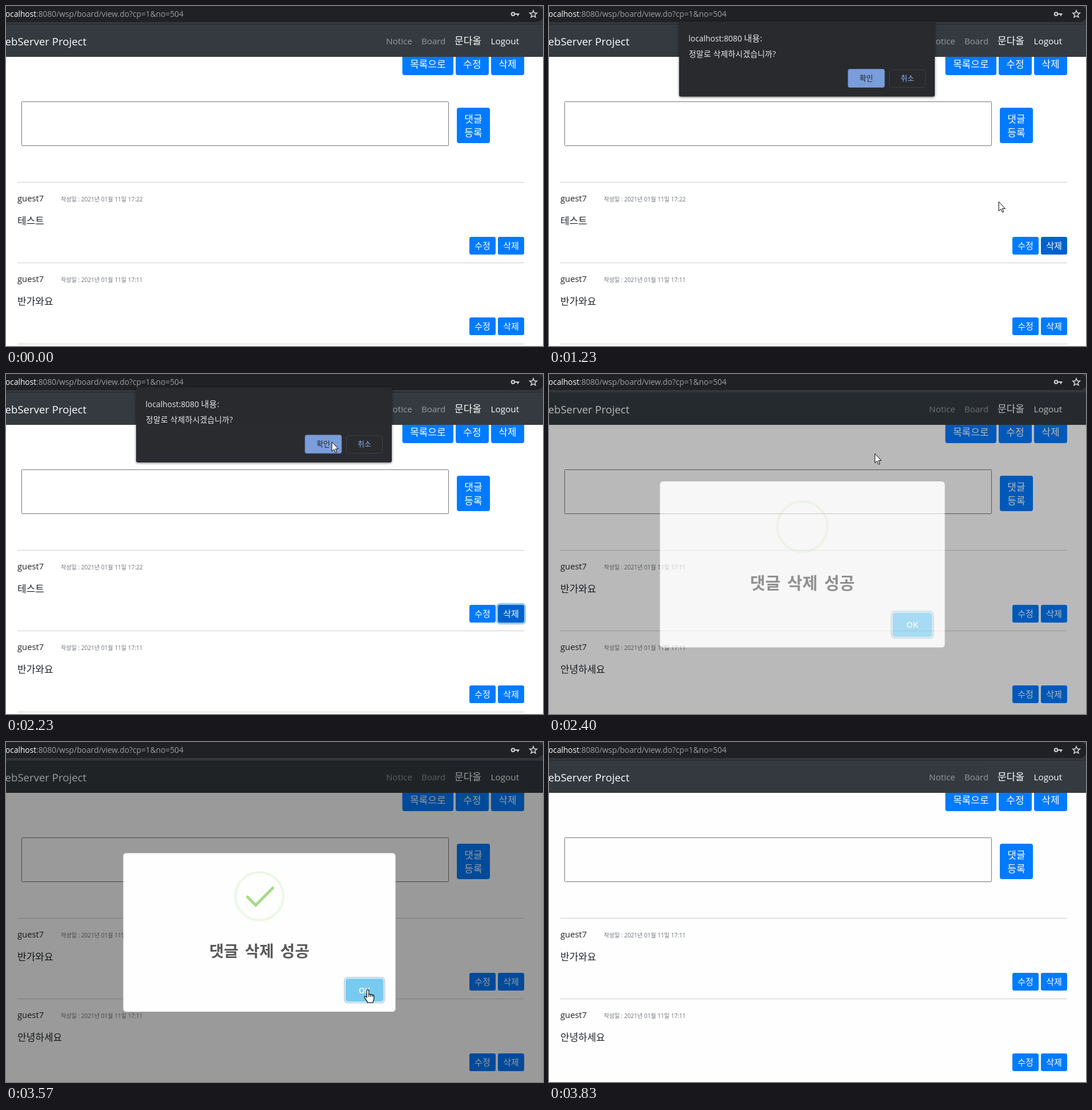
Animation of 941x595 px, one loop 3.86 s. Source, as an HTML page:

```html
<!DOCTYPE html>
<html lang="ko">
<head>
<meta charset="utf-8">
<title>Board comments</title>
<style>
html, body { margin: 0; width: 100%; height: 100%; overflow: hidden; background: #fff; }
svg { display: block; width: 941px; height: 595px; }
text { font-family: 'Open Sans', 'Noto Sans CJK KR', sans-serif; white-space: pre; }
.mid { text-anchor: middle; }
.end { text-anchor: end; }
#dialog { filter: drop-shadow(0 1px 2px rgba(0,0,0,.55)); }
</style>
</head>
<body>
<svg id="stage" viewBox="0 0 941 595"></svg>
<script>
const LOOP = 3860, DIALOG_IN = 1010, DIALOG_OUT = 2215, RELOAD = 2275,
      ALERT_IN = 2280, ALERT_OUT = 3567;
const BLUE = [0, 123, 255], DARK = [0, 98, 204];
const before = [['17:22', '테스트'], ['17:11', '반가와요']];
const after = [['17:11', '반가와요'], ['17:11', '안녕하세요']];

const text = (x, y, size, fill, str, attrs = '') =>
  `<text x="${x}" y="${y}" font-size="${size}" fill="${fill}" ${attrs}>${str}</text>`;
const rect = (x, y, w, h, fill, attrs = '') =>
  `<rect x="${x}" y="${y}" width="${w}" height="${h}" fill="${fill}" ${attrs}/>`;
const label = (x, y, size, str) => text(x, y, size, '#fff', str, 'class="mid"');
const button = (x, w, str) =>
  rect(x, 83, w, 38, '#007bff', 'rx="4"') + label(x + w / 2, 108, 17, str);
const small = (x, y, str, id) =>
  rect(x, y, 46, 31, '#007bff', `rx="3.2" id="${id}"`) + label(x + 23, y + 20.5, 15, str);

function comment(i) {
  const y = i * 141;
  return rect(20, 308 + y, 888, 1, '#ccc') +
    text(20, 342 + y, 14.8, '#212529', 'guest7') +
    text(96, 342 + y, 10.1, '#6c757d', '', `id="date${i}"`) +
    text(20, 381.5 + y, 17, '#212529', '', `id="body${i}"`) +
    small(812, 404 + y, '수정', 'edit' + i) + small(862, 404 + y, '삭제', 'del' + i);
}

const star = Array.from({ length: 10 }, (_, i) => {
  const a = i * Math.PI / 5, r = i % 2 ? 2.9 : 6.6;
  return (924 + r * Math.sin(a)).toFixed(1) + ',' + (14.4 - r * Math.cos(a)).toFixed(1);
}).join(' ');

const toolbar = rect(0, 0, 941, 33, '#35363a') + rect(-30, 0, 973, 28, '#202124', 'rx="14"') +
  rect(0, 32, 941, 1, '#292a2d') +
  text(53, 19, 13.7, '#fff', 'localhost', 'class="end"') +
  text(53, 19, 13.8, '#9aa0a6', ':8080/wsp/board/view.do?cp=1&amp;no=504') +
  `<g fill="none" stroke="#d5d7da" stroke-width="2"><circle cx="888.5" cy="14" r="2.8"/>
   <path d="M891 14H899.5M897 14V17.5"/></g>
   <polygon points="${star}" fill="none" stroke="#d5d7da" stroke-width="1.5"/>`;

const page = rect(0, 33, 941, 562, '#fff') +
  button(694.5, 89.5, '목록으로') + button(788, 58, '수정') + button(850, 58, '삭제') +
  rect(27.5, 167.5, 748, 77, '#fff', 'stroke="#767676" rx="1"') +
  rect(790, 178, 58, 62, '#007bff', 'rx="4"') +
  label(819, 204, 17, '댓글') + label(819, 228, 17, '등록') +
  comment(0) + comment(1) + rect(20, 591, 888, 1, '#ccc', 'id="lastLine"') +
  rect(860.4, 402.4, 49.2, 34.2, 'none', 'id="focus" rx="5" stroke="#268fff" stroke-opacity=".5" stroke-width="3.2"') +
  rect(0, 33, 941, 56, '#343a40') +
  text(141, 68.5, 18.6, '#fff', 'WebServer Project', 'class="end"') +
  text(666, 67, 15.3, '#999c9f', 'Notice') + text(728, 67, 15, '#999c9f', 'Board') +
  text(786, 67, 17, '#fff', '문다올') + text(849.5, 67, 15.3, '#fff', 'Logout');

const dialog = `<g id="dialog">` + rect(228, 27, 448, 131.5, '#292a2d', 'rx="3"') +
  text(244.5, 61.5, 13.9, '#e8eaed', 'localhost:8080 <tspan font-size="15.2">내용:</tspan>') +
  text(245, 89, 13.9, '#e8eaed', '정말로 삭제하시겠습니까?', 'letter-spacing=".2"') +
  rect(524, 110.5, 64, 32, '#7a9edb', 'rx="3" stroke="#5f7fb5"') +
  text(556, 130.5, 12.8, '#202124', '확인', 'class="mid"') +
  rect(596.5, 111.5, 63, 31, 'none', 'rx="3" stroke="#3c4043"') +
  text(628, 130.5, 12.8, '#8ab4f8', '취소', 'class="mid"') + '</g>';

// Icon coordinates start at the inner corner of its 80px ring.
const icon = `<g transform="translate(404 230)">
  <circle cx="40" cy="40" r="42" fill="none" stroke="#a5dc86" stroke-width="4"/>
  <path d="M27-7a60 60 0 0 0 0 120Z" fill="#fff" transform="rotate(-45 27 53)"/>
  <path id="sweep" d="M30-11a60 60 0 0 1 0 120Z" fill="#fff"/>
  ${rect(28, 8, 5, 90, '#fff', 'transform="rotate(-45 30.5 53)"')}
  <circle cx="40" cy="40" r="42" fill="none" stroke="#a5dc86" stroke-opacity=".2" stroke-width="4"/>
  ${rect(0, 0, 0, 5, '#a5dc86', 'id="tip" rx="2"')}${rect(0, 0, 0, 5, '#a5dc86', 'id="long" rx="2"')}</g>`;

const alertBox = `<g id="overlay">` + rect(0, 33, 941, 562, '#000', 'fill-opacity=".4"') +
  `<g id="modal">` + rect(205.5, 194.5, 477, 277.5, '#fff', 'rx="5"') + icon +
  text(444, 375.5, 27.8, '#000', '댓글 삭제 성공', 'class="mid" font-weight="700" word-spacing="3.8" fill-opacity=".65"') +
  rect(592, 411, 72.5, 46.5, '#2b72a5', 'rx="7" fill-opacity=".29"') +
  rect(594, 413, 68.5, 42.5, '#fff', 'rx="6"') +
  rect(595, 414, 66.5, 40.5, '#7cd1f9', 'rx="5" id="ok"') +
  text(628, 439.5, 14, '#fff', 'OK', 'class="mid" font-weight="600"') + '</g></g>';

const cursors = `<g id="cursor" stroke="#000" fill="#fff" stroke-linejoin="round">
  <path id="arrow" d="M0 0V16.2L3.8 12.8 6.3 18.6 8.7 17.6 6.3 12H11.3Z"/>
  <path id="hand" stroke-width="1.2" d="M-1.8 13V1.2a1.8 1.8 0 0 1 3.6 0V8.2c.4-1.4 3.2-1.4 3.4.3 .6-1.1 3-.9 3.2.7 .8-.8 2.4-.4 2.4 1.2V15c0 3-1.8 4-1.8 7H-.6c0-2.5-3.4-5.5-5.2-8.8-.8-1.6 1-2.8 2.2-1.6ZM1.8 8V12M5.2 8.6V12M8.4 9.4V12"/></g>`;

document.getElementById('stage').innerHTML = toolbar + page + dialog + alertBox + cursors;
const el = {};
document.querySelectorAll('[id]').forEach(n => el[n.id] = n);
const set = (n, attrs) => { for (const k in attrs) n.setAttribute(k, attrs[k]); };
const show = (n, on) => set(n, { visibility: on ? 'visible' : 'hidden' });

const clamp = v => Math.max(0, Math.min(1, v));
const ramp = (t, start, len) => clamp((t - start) / len);
const mix = (a, b, p) => a + (b - a) * p;
const linear = p => p;
const bez = (s, a, b) => 3 * s * (1 - s) * (1 - s) * a + 3 * s * s * (1 - s) * b + s * s * s;

// cubic-bezier(.25, .1, .25, 1)
function ease(p) {
  if (p <= 0 || p >= 1) return clamp(p);
  let lo = 0, hi = 1;
  for (let i = 0; i < 24; i++) {
    const s = (lo + hi) / 2;
    if (bez(s, .25, .25) < p) lo = s; else hi = s;
  }
  return bez(lo, .1, 1);
}

// Rows are [position, ...values]; returns the values at p.
function track(rows, p, fn = ease) {
  if (p <= rows[0][0]) return rows[0].slice(1);
  for (let i = 1; i < rows.length; i++) {
    const a = rows[i - 1], b = rows[i];
    if (p < b[0]) {
      const k = fn((p - a[0]) / (b[0] - a[0]));
      return a.slice(1).map((v, j) => mix(v, b[j + 1], k));
    }
  }
  return rows[rows.length - 1].slice(1);
}

const path = [
  [370, 594, 486], [470, 640, 477], [640, 775, 436], [770, 844, 421], [880, 885, 421],
  [1110, 885, 421], [1220, 800, 350], [1400, 606, 228], [1430, 600, 222], [1560, 505, 163],
  [1630, 486, 147], [1700, 492, 138], [1830, 548, 108], [1930, 571, 119], [2250, 571, 119],
  [2400, 571, 139], [2560, 585, 215], [2760, 618, 360], [2900, 631, 424], [2980, 634, 434]
];
const popScale = [[0, 1], [.01, .5], [.45, 1.05], [.8, .95], [1, 1]];
const tipRows = [[.54, 0, 1, 19], [.7, 50, -8, 37], [.84, 17, 21, 48], [1, 25, 14, 45]];
const longRows = [[.65, 0, 46, 54], [.84, 55, 0, 35], [1, 47, 8, 38]];

function hover(n, p) {
  set(n, { fill: `rgb(${BLUE.map((v, i) => Math.round(mix(v, DARK[i], p)))})` });
}
function stroke(n, x, y, w, angle) {
  set(n, { x, y, width: w, transform: `rotate(${angle} ${x + w / 2} ${y + 2.5})` });
}

function drawPage(t) {
  const reloaded = t >= RELOAD;
  (reloaded ? after : before).forEach(([time, body], i) => {
    el['date' + i].textContent = `작성일 : 2021년 01월 11일 ${time}`;
    el['body' + i].textContent = body;
  });
  show(el.lastLine, !reloaded);
  hover(el.edit0, ease(ramp(t, 755, 150)) * (1 - ramp(t, 810, 80)));
  hover(el.del0, reloaded ? 0 : ease(ramp(t, 815, 150)));
  show(el.focus, !reloaded);
  set(el.focus, { opacity: ease(ramp(t, DIALOG_OUT - 45, 80)) });
}

function drawDialog(t) {
  const leave = ramp(t, DIALOG_OUT, 75);
  const lift = leave || 1 - ease(ramp(t, DIALOG_IN, 150));
  show(el.dialog, t >= DIALOG_IN && leave < 1);
  set(el.dialog, { transform: `translate(0 ${-17 * lift})`, opacity: 1 - lift ** 3 });
}

function drawAlert(t) {
  const s = t - ALERT_IN, closing = t >= ALERT_OUT;
  const fade = len => closing ? 1 - ease(ramp(t, ALERT_OUT, len)) : ease(ramp(s, 0, len));
  show(el.overlay, s >= 0);
  set(el.overlay, { opacity: fade(300) });
  const [k] = track(popScale, s / 300);
  set(el.modal, { opacity: fade(200), transform: `translate(444 333) scale(${k}) translate(-444 -333)` });
  const [turn] = track([[.05, -45], [.12, -405]], s / 4250);
  set(el.sweep, { transform: `rotate(${turn} 30 49)` });
  const p = s / 750;
  const [tw, tx, ty] = p < 1 ? track(tipRows, p) : [25, 14, 46];
  stroke(el.tip, tx, ty, tw, 45);
  const [lw, right, ly] = track(longRows, p);
  stroke(el.long, 80 - right - lw, ly, lw, -45);
  set(el.ok, { fill: t > 2890 ? '#78cbf2' : '#7cd1f9' });
}

function drawCursor(t) {
  const [x, y] = track(path, t, linear);
  const hand = (t > 750 && t < DIALOG_IN + 20) || t > 2890;
  const on = t >= 370 && t < 3815;
  set(el.cursor, { transform: `translate(${x.toFixed(1)} ${y.toFixed(1)})` });
  show(el.arrow, on && !hand);
  show(el.hand, on && hand);
}

function draw(t) {
  drawPage(t);
  drawDialog(t);
  drawAlert(t);
  drawCursor(t);
}

const start = performance.now();
function tick() {
  draw((performance.now() - start) % LOOP);
  requestAnimationFrame(tick);
}
tick();
</script>
</body>
</html>
```
